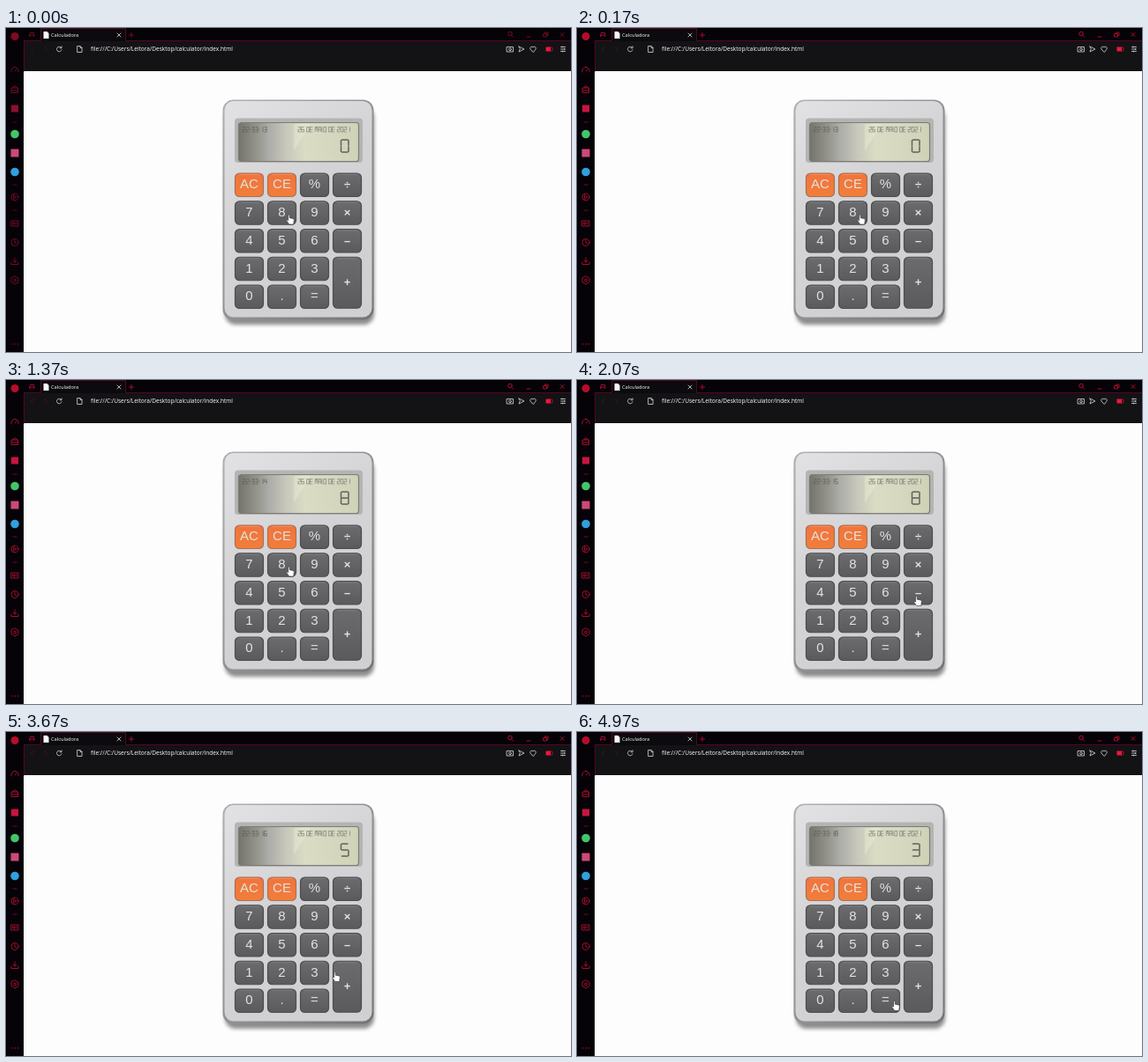
An HTML page for the animation above (5110 ms loop, 640 by 368 pixels).

```html
<!DOCTYPE html>
<html lang="pt">
<head>
<meta charset="utf-8">
<title>Calculadora</title>
<style>
  html, body { margin: 0; width: 100%; height: 100%; overflow: hidden; background: #fdfdfd; }
  svg { display: block; width: 640px; height: 368px; }
  .ui { font-family: "Open Sans", sans-serif; fill: #fff; }
  .key { font: 15px "Liberation Sans", Arial, sans-serif; fill: #e2e2e2; text-anchor: middle; }
  .operator { font-size: 13px; font-weight: bold; }
  .line { fill: none; stroke-width: .9; stroke-linecap: round; stroke-linejoin: round; }
  .seg { fill: none; stroke-linecap: round; }
</style>
</head>
<body>
<svg viewBox="0 0 640 368">
  <defs>
    <linearGradient id="body" x2=".5" y2="1">
      <stop stop-color="#e2e2e4"/><stop offset=".5" stop-color="#d4d4d6"/><stop offset="1" stop-color="#d0d0d2"/>
    </linearGradient>
    <linearGradient id="rim" x2="1" y2="1">
      <stop stop-color="#b0b0b0"/><stop offset="1" stop-color="#747476"/>
    </linearGradient>
    <linearGradient id="lcd">
      <stop stop-color="#74746c"/><stop offset=".15" stop-color="#94948c"/><stop offset=".25" stop-color="#acaca8"/>
      <stop offset=".4" stop-color="#c8c8bc"/><stop offset=".55" stop-color="#dadcc4"/><stop offset="1" stop-color="#d0d2b8"/>
    </linearGradient>
    <linearGradient id="dark" x2="0" y2="1"><stop stop-color="#6c6c6e"/><stop offset="1" stop-color="#5a5a5c"/></linearGradient>
    <linearGradient id="orange" x2="0" y2="1"><stop stop-color="#f0743c"/><stop offset="1" stop-color="#f27e3a"/></linearGradient>
    <filter id="blur"><feGaussianBlur stdDeviation="2"/></filter>
  </defs>

  <!-- browser frame -->
  <path fill="#050308" d="M0 0H640V49H20V368H0z"/>
  <path fill="#131214" d="M21 15H640V49H21z"/>
  <path fill="#0c0a0e" d="M39 0H135V15H39z"/>
  <path class="line" stroke="#5c0828" d="M20.5 49V14.5H39.5V.5H135.5V14.5H640"/>
  <g id="icons" class="line" stroke="#b41030">
    <path d="M6 50a4.200 4.200 0 1 1 8 0M10 49l2-2M6.500 68h7v5.500h-7zM8 68a2 2 0 0 1 4 0M6.500 71h7"/>
    <path d="M8 107h4M8 178h4M8 207h4" opacity=".7"/>
    <circle cx="10" cy="192" r="4"/><path d="M9 190l3 2l-3 2z"/>
    <path d="M6 219h8v6H6zM8 221h2v2h-2zM12 221v2"/>
    <circle cx="10" cy="243.500" r="4"/><path d="M10 241v3l2 1"/>
    <path d="M10 261v5M8 264l2 2l2-2M6 266v2.500h8V266"/>
    <path d="M10 282l4 2.300v4.400L10 291l-4-2.300v-4.400z"/><circle cx="10" cy="286.500" r="1.500"/>
    <path d="M6.500 359h.1M10 359h.1M13.500 359h.1" stroke-width="1.400"/>
    <path d="M26.500 9.500l.8-4h4l.8 4l-2-1.500h-1.800zM139.500 8h5M142 5.500v5"/>
    <circle cx="571" cy="6.500" r="2.300"/><path d="M572.800 8.300l2 2M590 10h4M609 6.500h3.500V10H609zM610.500 6.500V5h3.500v3.500h-1.500M628 5.500l4 4M632 5.500l-4 4"/>
    <path d="M31 21.500l-2.500 2.500l2.500 2.500M44 21.500l2.500 2.500l-2.500 2.500" opacity=".4"/>
    <circle cx="10" cy="9.500" r="4.500" fill="#b80c2c" stroke="none"/>
    <rect x="6" y="87.500" width="8" height="8" fill="#c81440" stroke="none"/>
  </g>
  <circle cx="10" cy="120.500" r="4.800" fill="#44c468"/>
  <rect x="5.500" y="137.500" width="9" height="9" fill="#d04878"/>
  <circle cx="10" cy="163.500" r="4.800" fill="#30a0dc"/>
  <path fill="#f8f8f8" d="M42.500 4h4l2 2v6h-6z"/>
  <text class="ui" x="51" y="10.200" font-size="5.700">Calculadora</text>
  <text class="ui" x="96" y="26.300" font-size="6.500">file:///C:/Users/Leitora/Desktop/calculator/index.html</text>
  <g class="line" stroke="#c4c4c8">
    <path d="M126 6l4 4M130 6l-4 4M62.500 22.300a2.800 2.800 0 1 0 .5 2.500M63 20.800v2h-2"/>
    <path d="M81 20.500h3l2 2v5h-5zM84 20.500v2h2"/>
    <path d="M567.500 21.500h7v5.500h-7z"/><circle cx="571" cy="24.300" r="1.400"/>
    <path d="M581 21l6 3l-6 3l1.200-3zM597 27.300l-3-3.300a1.700 1.700 0 0 1 3-2a1.700 1.700 0 0 1 3 2z"/>
    <path d="M628.500 21.500h5M628.500 24h5M628.500 26.500h5M630 21v1M632.500 23.500v1M630.500 26v1"/>
  </g>
  <path fill="#f01440" d="M611.500 21.500h5.500v5h-5.500z"/><path class="line" stroke="#a01030" d="M617 22h2v4h-2"/>

  <!-- calculator -->
  <rect x="248" y="90" width="169" height="247" rx="12" fill="#686868" opacity=".75" filter="url(#blur)"/>
  <rect x="245.500" y="81.500" width="171" height="250" rx="12" fill="url(#rim)"/>
  <rect x="247.500" y="83" width="167" height="245.500" rx="10.500" fill="url(#body)"/>
  <rect x="259" y="102.500" width="145" height="50.500" rx="4" fill="#b4b4b4"/>
  <rect x="263.500" y="107.500" width="136" height="44" rx="3" fill="url(#lcd)" stroke="#7c7c74" stroke-width="1.200"/>
  <path d="M326 140L345 109H326z" fill="#e8ead0" opacity=".5"/>
  <path id="date" class="seg" stroke="#74746c" stroke-width=".6"/>
  <path id="clock" class="seg" stroke="#5c5c54" stroke-width=".6"/>
  <path id="value" class="seg" stroke="#60605a" stroke-width="1.500"/>
  <g id="keys"></g>
  <path id="hand" fill="#fff" stroke="#303030" stroke-width=".7" stroke-linejoin="round"
    d="M-2.800 -6q1.400-.9 1.900.5v3.300l4.600 1q1.600.4 1.400 2L4.500 5v1.500H-1.500L-5 1.500q-.2-1.500 1.400-.9l.8.800z"/>
</svg>
<script>
const $ = id => document.getElementById(id);
const LOOP = 5110;

// Seven-segment lettering, with small gaps where segments meet
const SEGMENTS = {
  a: [.12, 0, .88, 0], b: [1, .06, 1, .44], c: [1, .56, 1, .94], d: [.12, 1, .88, 1],
  e: [0, .56, 0, .94], f: [0, .06, 0, .44], g: [.12, .5, .88, .5]
};
const GLYPHS = {
  0: "abcdef", 1: "bc", 2: "abged", 3: "abgcd", 4: "fgbc", 5: "afgcd", 6: "afgedc", 7: "abc",
  8: "abcdefg", 9: "abcdfg", D: "abcdef", E: "afged", M: "abcef", A: "abcefg", I: "ef", O: "abcdef"
};
function segments(text, x, y, w, h, pitch) {
  let d = "";
  for (const ch of text) {
    if (ch === ":") d += `M${x + .5} ${y + h * .3}h.1M${x + .5} ${y + h * .7}h.1`;
    for (const s of GLYPHS[ch] || "") {
      const [x1, y1, x2, y2] = SEGMENTS[s];
      d += `M${x + x1 * w} ${y + y1 * h}L${x + x2 * w} ${y + y2 * h}`;
    }
    if (ch === "M") d += `M${x + w / 2} ${y}v${h / 2}`;
    x += ": I".includes(ch) ? pitch / 2 : pitch;
  }
  return d;
}

const rows = [["AC", "CE", "%", "÷"], [7, 8, 9, "×"], [4, 5, 6, "–"], [1, 2, 3, "+"], [0, ".", "="]];
$("keys").innerHTML = rows.map((row, r) => row.map((label, c) => {
  const x = 259.5 + c * 37, y = 165 + r * 31.75, h = label === "+" ? 58 : 26.5;
  const hot = r === 0 && c < 2;
  return `<rect x="${x}" y="${y}" width="32" height="${h}" rx="5" fill="url(#${hot ? "orange" : "dark"})"
      stroke="${hot ? "#a87058" : "#4c4c4e"}" stroke-width="1.2"/>
    <path class="line" stroke="${hot ? "#f4a478" : "#88888a"}" d="M${x + 5} ${y + 1.5}h22" opacity=".6"/>
    <text class="key ${c === 3 ? "operator" : ""}" x="${x + 16}" y="${y + h / 2 + 4.2}">${label}</text>`;
}).join("")).join("");
$("date").setAttribute("d", segments("26 DE MAIO DE 2021", 331, 112.5, 2.7, 5.5, 3.85));

// Pointer stops: time, x, y
const path = [
  [0, 322, 217.5], [1900, 322, 217.5], [2070, 386, 251], [2430, 386, 251], [2730, 326, 251.5],
  [3530, 326, 251.5], [3670, 374, 278], [3790, 392, 293], [3930, 389, 284], [4170, 389, 284],
  [4570, 361, 311], [LOOP, 361, 311]
];
const ease = p => p * p * (3 - 2 * p);
function pointerAt(t) {
  const i = path.findIndex(stop => stop[0] > t);
  const [t0, x0, y0] = path[i - 1], [t1, x1, y1] = path[i];
  const p = ease((t - t0) / (t1 - t0));
  return [x0 + (x1 - x0) * p, y0 + (y1 - y0) * p];
}

function draw(now) {
  const t = now % LOOP;
  const second = 13 + Math.floor((t + 70) / 1000);
  const value = t < 1030 ? "0" : t < 3300 ? "8" : t < 4770 ? "5" : "3";
  $("clock").setAttribute("d", segments("22:33:" + second, 268.5, 112.5, 2.6, 5.5, 4));
  $("value").setAttribute("d", segments(value, 379.5, 127, 8.5, 14, 12));
  $("hand").setAttribute("transform", `translate(${pointerAt(t)}) scale(.85)`);
  $("icons").setAttribute("opacity", Math.min(1, .7 + t / 560));
  requestAnimationFrame(draw);
}
requestAnimationFrame(draw);
</script>
</body>
</html>
```
